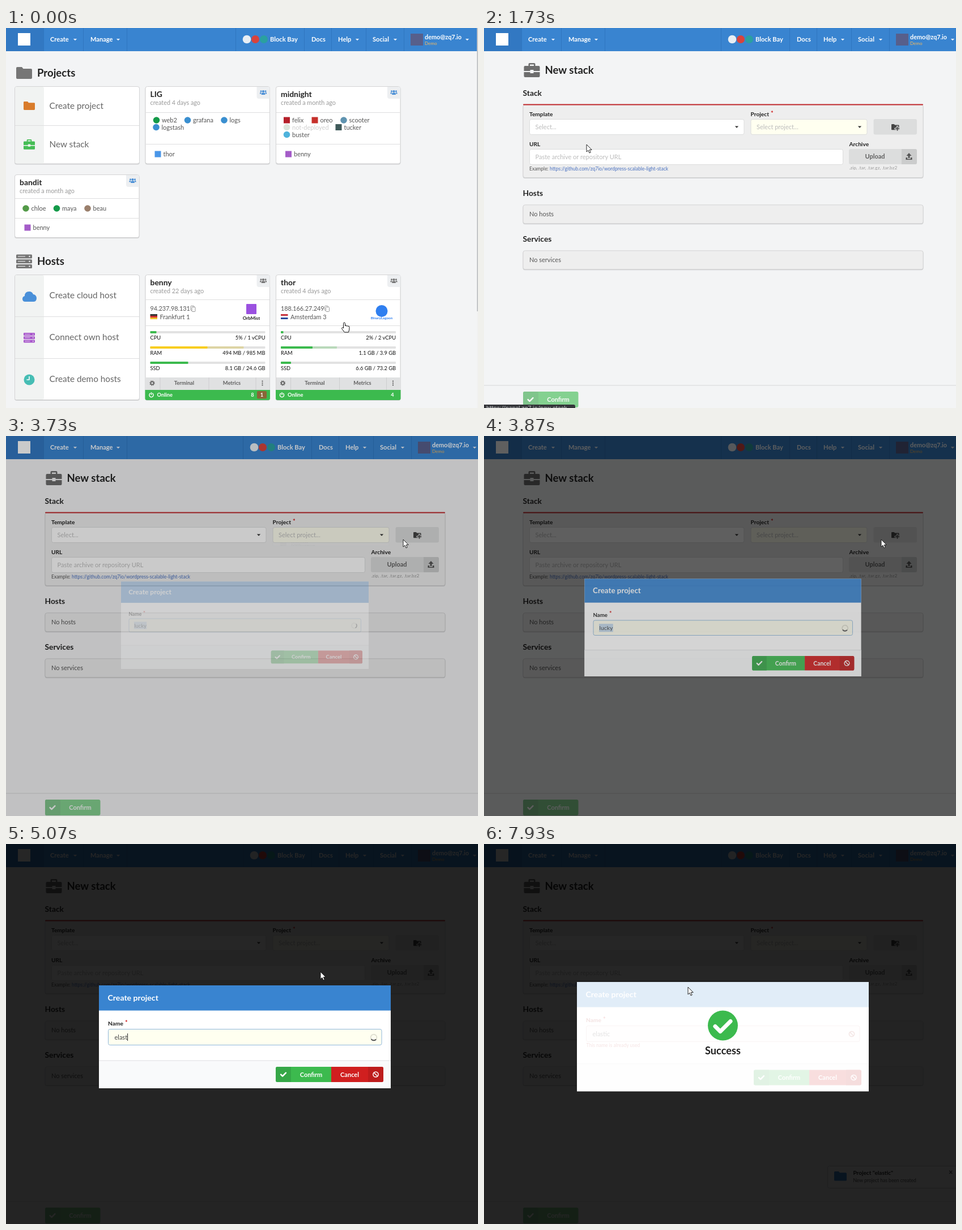
Animation of 833x672 px, one loop 8000 ms. Source, as an HTML page:

```html
<!DOCTYPE html>
<html lang="en">
<head>
<meta charset="utf-8">
<title>New stack</title>
<style>
html,body{margin:0;width:100%;height:100%;overflow:hidden;background:#f3f4f5}
svg{display:block;width:833px;height:672px}
text{font-family:Lato,sans-serif;white-space:pre}
</style>
</head>
<body>
<svg id="stage" viewBox="0 0 833 672" xmlns="http://www.w3.org/2000/svg"></svg>
<script>
const BLUE = '#3984d0', GREEN = '#3cba4e', RED = '#d01f1f', GREY = '#767676', INK = '#222';

// ---- drawing helpers, each returns SVG markup ----
const text = (x, y, s, size, fill = INK, bold = 0, anchor = 'start', more = '') =>
  `<text x="${x}" y="${y}" font-size="${size}" fill="${fill}" font-weight="${bold ? 700 : 400}" text-anchor="${anchor}" ${more}>${s}</text>`;
const rect = (x, y, w, h, fill, r = 0, more = '') =>
  `<rect x="${x}" y="${y}" width="${w}" height="${h}" rx="${r}" fill="${fill}" ${more}/>`;
const path = (d, fill, more = '') => `<path d="${d}" fill="${fill}" ${more}/>`;
const line = (d, color, w = 1) => path(d, 'none', `stroke="${color}" stroke-width="${w}" stroke-linecap="round" stroke-linejoin="round"`);
const dot = (x, y, r, fill) => `<circle cx="${x}" cy="${y}" r="${r}" fill="${fill}"/>`;
const group = (s, more = '') => `<g ${more}>${s}</g>`;
const at = (x, y, k, s) => group(s, `transform="translate(${x} ${y}) scale(${k})"`);
const rule = (x, y, w, c = '#dededf') => rect(x, y, w, 1, c);
const framed = (x, y, w, h, fill, stroke, r = 3) =>
  rect(x + .5, y + .5, w - 1, h - 1, fill, r, `stroke="${stroke}"`);
const panel = (x, y, w, h, fill = '#fff') =>
  rect(x, y + 1, w, h, '#cfd0d1', 4) + framed(x, y, w, h, fill, '#d4d4d5', 3.5);
const caret = (x, y, fill = '#333', k = 1) => at(x, y, k, path('M-3.2-1.6h6.4L0 1.8z', fill));

// ---- icons ----
const folder = (x, y, w, fill) => at(x, y, w / 28,
  path('M0 2Q0 0 2 0h8l2.5 3H26q2 0 2 2v14q0 2-2 2H2q-2 0-2-2z', fill));
const briefcase = (x, y, w, fill) => at(x, y, w / 28,
  path('M8 5V2q0-2 2-2h8q2 0 2 2v3h6q2 0 2 2v7H17v-2h-6v2H0V7q0-2 2-2zM10.5 5h7V2.5h-7z', fill, 'fill-rule="evenodd"') +
  path('M0 16h11v2h6v-2h11v7q0 2-2 2H2q-2 0-2-2z', fill));
const servers = (x, y, w, fill) => at(x, y, w / 28, [0, 8.7, 17.4].map(v =>
  rect(0, v, 28, 7, fill, 1.5) + rect(3, v + 3, 13, 1, '#f3f4f5') + dot(23.5, v + 3.5, 1.2, '#f3f4f5')).join(''));
const users = (x, y, fill) => at(x, y, 1,
  dot(0, -2, 2.1, fill) + dot(-4, -2.2, 1.5, fill) + dot(4, -2.2, 1.5, fill) +
  path('M-3.3 4V2.2Q-3.3.6-1.5.6h3q1.8 0 1.8 1.6V4z', fill) +
  path('M-6 2.4V1Q-6-.2-4.5-.2h1.4Q-4 1-4 2.4zM6 2.4V1Q6-.2 4.5-.2H3.1Q4 1 4 2.4z', fill));
const tick = (x, y, k, fill) => at(x, y, k, line('M-4.2.2L-1.4 3 4.2-2.8', fill, 2.4));
const ban = (x, y, fill) => at(x, y, 1, `<circle r="4.6" fill="none" stroke="${fill}" stroke-width="1.5"/>` + line('M-3-3L3 3', fill, 1.5));
const power = (x, y) => at(x, y, 1, line('M-2-2.8a3.6 3.6 0 1 0 4 0M0-4.2V-.5', '#fff', 1.4));
const gear = (x, y) => at(x, y, 1, `<circle r="2.6" fill="none" stroke="#666" stroke-width="1.9"/>` +
  `<circle r="4" fill="none" stroke="#666" stroke-width="1.3" stroke-dasharray="1.57 1.57"/>`);

// ---- navigation bar ----
function nav(dx, w) {
  const item = (x, s, c) => text(x, 24, s, 11.1, '#fff', 1) + (c ? caret(c, 20.5, '#e4eefa') : '');
  const sep = x => rect(x, 0, 1, 41, '#2f76c0');
  return rect(0, 0, w, 41, BLUE) + rect(0, 0, 66, 41, '#3278c2') + rect(21, 9, 22, 22, '#fff') +
    item(78, 'Create', 122) + item(149, 'Manage', 198) + [66, 136, 213].map(sep).join('') +
    group([405, 526, 574, 635, 702].map(sep).join('') +
      dot(425, 20, 7.3, '#e8eef4') + dot(440, 20, 7, '#d8433c') + dot(455, 20, 7, '#2aa0a0') +
      item(466, 'Block Bay') + item(539, 'Docs') + item(586, 'Help', 620) + item(647, 'Social', 687) +
      rect(714, 10, 22, 21, '#575f8c') + text(739, 20, 'demo@zq7.io', 10.8, '#fff', 1) +
      text(739, 30, 'Demo', 8.1, '#f5b95c') + caret(814, 20.5, '#e4eefa'), `transform="translate(${dx} 0)"`);
}

// ---- dashboard ----
function choices(y, h, rows) {
  const step = h / rows.length;
  return panel(15, y, 221, h) + rect(16, y + 1, 51, h - 2, '#f1f3f2', 3) +
    rows.map(([s, icon], i) => (i ? rule(16, Math.round(y + i * step), 219) : '') + icon +
      text(76.5, y + (i + .5) * step + 5.3, s, 15.3, '#666')).join('');
}
const head = (x, y, h, name, age, tint) => panel(x, y, 220.5, h) +
  path(`M${x + 197} ${y + 1}h20q3 0 3 3v18h-19q-4 0-4-4z`, '#edeff1') + users(x + 208.5, y + 11, tint) +
  text(x + 9, y + 19.3, name, 13.9, INK, 1) + text(x + 9, y + 33, 'created ' + age + ' ago', 10.8, '#999') ;
const tag = (x, y, s, c, round = 1, ink = '#555') =>
  (round ? dot(x - 16, y, 5.8, c) : rect(x - 21.5, y - 5.5, 11, 11, c)) + text(x - 6.5, y + 4, s, 11, ink);
function project(x, y, h, name, age, mid, low, tags) {
  return head(x, y, h, name, age, '#4a8fd6') + rule(x + 1, y + mid, 218.5) + rule(x + 1, y + low, 218.5) +
    tags.map(a => tag(...a)).join('');
}
const meter = (x, y, name, val, a, b, c, pale) => rect(x, y - 2, 203, 4, '#e2e2e2', 1) +
  (b ? rect(x, y - 2, b, 4, pale, 1) : '') + rect(x, y - 2, a, 4, c, 1) +
  text(x, y + 12.5, name, 9.3, '#111') + text(x + 203, y + 12.5, val, 9.3, '#111', 0, 'end');
function host(x, name, age, ip, place, flag, mark, meters, count) {
  const l = x + 9;
  const ipEnd = x + 84 + (ip.length > 13 ? 6 : 0);
  return head(x, 436, 222, name, age, GREY) + rule(x + 1, 480, 218.5) + rule(x + 1, 526, 218.5) +
    text(l, 500, ip, 10.8, '#555') + framed(ipEnd - 4, 491, 7, 9, '#fff', '#999', 1) + framed(ipEnd - 2, 493, 7, 9, '#fff', '#999', 1) +
    flag.map((c, i) => rect(l, 506 + i * 3, 12.5, 3, c)).join('') + text(x + 26, 514.5, place, 10.8, '#555') + mark +
    meters.map((m, i) => meter(l, 538 + i * 27, ...m)).join('') +
    rect(x + 1, 618, 218.5, 22, '#e0e1e2') + gear(x + 12.5, 628) +
    [26, 112, 195].map(d => rect(x + d, 618, 1, 22, '#cdcecf')).join('') +
    text(x + 69, 631.3, 'Terminal', 9.3, '#606060', 1, 'middle') + text(x + 153, 631.3, 'Metrics', 9.3, '#606060', 1, 'middle') +
    [-3.4, 0, 3.4].map(d => dot(x + 207, 628 + d, 1.1, '#555')).join('') +
    path(`M${x} 640h220.5v15q0 3-3 3h-214.500q-3 0-3-3z`, GREEN) + power(x + 11, 649) +
    text(x + 21, 652.3, 'Online', 9.3, '#fff', 1) + count;
}
const num = (x, s) => text(x, 652.3, s, 9.3, '#fff', 1, 'middle');

function dashboard() {
  const whale = '#3a8fd0', ngx = '#149a49', wave = '#a45cc8';
  return rect(0, 0, 833, 672, '#f3f4f5') + nav(0, 831) + rect(831, 0, 2, 672, '#f1f1f1') + rect(831, 0, 2, 501, '#c4c6c8') +
    folder(18, 69, 28, GREY) + text(55, 86, 'Projects', 18.57, INK, 1) +
    choices(103, 137.500, [['Create project', folder(31, 130, 20, '#d97c2b')], ['New stack', briefcase(31, 197, 20, '#45bd55')]]) +
    project(245.5, 103, 137.500, 'LIG', '4 days', 46, 102, [
      [281.5, 163, 'web2', ngx], [336.5, 163, 'grafana', whale], [401, 163, 'logs', whale],
      [281, 175.5, 'logstash', whale], [284, 223, 'thor', '#4a96e8', 0]]) +
    project(476, 103, 137.500, 'midnight', 'a month', 46, 102, [
      [511.5, 163, 'felix', '#b5202a', 0], [561, 163, 'oreo', '#c6302b', 0], [612, 163, 'scooter', '#5f93b0'],
      [511.5, 175.5, 'not-deployed', '#dde5dc', 1, '#cfcfcf'], [603, 175.5, 'tucker', '#3f5a5a', 0],
      [511.5, 188.5, 'buster', '#4fb3dc'], [514.5, 223, 'benny', wave, 0]]) +
    project(15, 259, 112, 'bandit', 'a month', 42, 77, [
      [51, 319, 'chloe', '#539a48'], [105.5, 319, 'maya', ngx], [160, 319, 'beau', '#9a7f6c'], [54, 353, 'benny', wave, 0]]) +
    servers(18, 400.5, 28, GREY) + text(55, 419, 'Hosts', 18.57, INK, 1) +
    choices(436, 222, [
      ['Create cloud host', path('M34 484q-5 0-5-5 0-4 4-5 0-8 8-8 5 0 7 5 5 0 6 6.500 0 6-5 6.500z', '#4a90d9')],
      ['Connect own host', servers(31, 539, 20, '#a959cc')],
      ['Create demo hosts', dot(41, 622, 9.5, '#46bdb4') + line('M41 616.5V622h-4', '#fff', 1.6)]]) +
    host(245.5, 'benny', '22 days', '94.237.98.131', 'Frankfurt 1', ['#333', '#d03030', '#f0c030'],
      rect(424, 488, 18, 18, '#9b51e0', 1) + text(433, 515.5, 'OrbMist', 8.2, INK, 1, 'middle'),
      [['CPU', '5% / 1 vCPU', 11, 0, GREEN], ['RAM', '494 MB / 985 MB', 101, 165, '#f8cd1c', '#ddd4a4'],
       ['SSD', '8.1 GB / 24.6 GB', 67, 0, GREEN]],
      num(435, '8') + rect(443, 642, 17, 13.500, '#8a6637', 2) + num(451.5, '1')) +
    host(476, 'thor', '4 days', '188.166.27.249', 'Amsterdam 3', ['#c8323c', '#fff', '#2c4c9c'],
      dot(663, 500.5, 10.5, '#2f7ff0') + text(663, 515, 'BinaryLagoon', 6.3, '#2f7ff0', 1, 'middle'),
      [['CPU', '2% / 2 vCPU', 4.5, 0, GREEN], ['RAM', '1.1 GB / 3.9 GB', 56, 99, GREEN, '#b9d9ba'],
       ['SSD', '6.6 GB / 73.2 GB', 18, 0, GREEN]], num(682, '4'));
}

// ---- form page ----
function formPage() {
  const label = (x, y, s) => text(x, y, s, 10.2, INK, 1);
  const field = (x, y, w, s, fill = '#fff') => framed(x, y, w, 28, fill, '#dcdddd') + text(x + 10.5, y + 18, s, 11, '#bcbcbc');
  const row = (y, title, s) => text(68.5, y, title, 13.8, INK, 1) + panel(68.5, y + 15, 707, 34, '#eee') + text(80, y + 35.8, s, 11, '#555');
  return rect(0, 0, 833, 672, '#f3f4f5') + nav(13, 833) +
    briefcase(70.5, 62, 28, '#6d6d6d') + text(107.5, 81, 'New stack', 18.57, INK, 1) +
    text(68.5, 120.3, 'Stack', 13.8, INK, 1) + panel(68.5, 135, 707, 130, '#eee') + rect(69, 134.5, 706, 2, '#c0292c', 1) +
    label(80, 156.3, 'Template') + field(80, 161, 379.5, 'Select...') + caret(446, 175) +
    label(470.5, 156.3, 'Project') + text(506, 155, '*', 11, RED, 1) + field(470.5, 161, 206, 'Select project...', '#fffff0') + caret(663, 175) +
    rect(687.5, 161, 76.5, 27.5, '#dcdddd', 3) + folder(719, 170, 13.5, '#444') +
    line('M729.5 174.5v7M726 178h7', '#dcdddd', 3.6) + line('M729.5 175v6M726.5 178h6', '#444', 1.7) +
    label(80, 209.3, 'URL') + field(80, 214, 554, 'Paste archive or repository URL') +
    text(80, 251.500, 'Example:', 8.5, '#555') +
    text(116, 251.500, 'https://github.com/zq7io/wordpress-scalable-light-stack', 8.5, '#4870c0') +
    label(644.5, 209.3, 'Archive') + rect(644, 214, 120, 27, '#dcdddd', 3) + path('M737 214h24q3 0 3 3v21q0 3-3 3h-24z', '#cbcccc') +
    text(690, 231.3, 'Upload', 11, '#606060', 1, 'middle') +
    path('M750 221l4.500 5h-3v4h-3v-4h-3zM744.500 229h2.500v2.500h6V229h2.500v4h-11z', '#555') +
    text(644.5, 250, '.zip, .tar, .tar.gz, .tar.bz2', 8.3, '#9a9a9a') +
    row(297.300, 'Hosts', 'No hosts') + row(378.300, 'Services', 'No services') +
    rule(0, 631.5, 833, '#d6d7d8') +
    group(rect(69, 643, 97.5, 28, GREEN, 3) + rect(69, 643, 27, 28, '#35a747', 3) + tick(82, 657, 1.05, '#fff') +
      text(131, 661, 'Confirm', 11, '#fff', 1, 'middle'), 'opacity=".6"');
}
const menu = () => framed(470.5, 188, 206, 86, '#fff', '#96c8da') + rect(471.5, 189, 204, 28, '#f2f2f2', 0, 'id="hover"') +
  ['bandit', 'LIG', 'midnight'].map((s, i) => folder(484, 199 + i * 28, 11, '#555') + text(503, 207 + i * 28, s, 11)).join('');
const toast = () => framed(606, 569, 240, 40, '#f7f8f9', '#c9cacb') + folder(618, 579, 22, BLUE) +
  text(651.5, 584.800, 'Project "elastic"', 10, INK, 1) + text(651.5, 598.300, 'New project has been created', 8.5, '#555') +
  line('M821.500 578l4.500 4.500M826 578l-4.500 4.500', '#555', 1.3);

// ---- modal ----
function modal() {
  return rect(164, 250, 515, 182, '#fff', 0, 'id="sheet"') +
    group(rect(164, 250, 515, 44.5, BLUE) + text(179.5, 276.800, 'Create project', 14.1, '#fff', 1) +
      text(180, 321.300, 'Name', 10.2, INK, 1, 'start', 'id="label"') + text(210, 319.500, '*', 11, RED, 1) +
      rect(180.5, 327.5, 482.5, 28, '#fffff0', 3, 'id="input" stroke="#8fb8dc"') +
      rect(191, 334, 10, 15, '#c3d9ec', 0, 'id="mark"') + text(191.5, 345.800, '', 11, '#444', 0, 'start', 'id="value"') +
      rect(191, 335, 1, 13, '#222', 0, 'id="beam"') +
      group(tick(649, 342, 1.05, GREEN), 'id="okIcon"') + group(ban(649, 342, '#b0504c'), 'id="badIcon"') +
      group('<circle r="5.300" fill="none" stroke="#000" stroke-opacity=".12" stroke-width="1.900"/>' +
        line('M-3.750-3.750A5.300 5.300 0 0 1 3.750-3.750', '#555', 1.9), 'id="spin"') +
      text(180.5, 365.300, 'This name is already used', 8.5, '#c04a46', 0, 'start', 'id="error"'), 'id="upper"') +
    group(rect(164, 383, 515, 49, '#f9fafb') + rule(164, 382.500, 515, '#dfe0e1') +
      path('M479 394h95v27h-95q-3 0-3-3v-21q0-3 3-3z', GREEN) + path('M479 394h24v27h-24q-3 0-3-3v-21q0-3 3-3z', '#35a747') +
      path('M574 394h89q3 0 3 3v21q0 3-3 3h-89z', RED) + path('M639 394h24q3 0 3 3v21q0 3-3 3h-24z', '#bd1c1c') +
      tick(489.500, 407.500, 1.05, '#fff') + text(538.5, 411.500, 'Confirm', 11, '#fff', 1, 'middle') +
      text(606.5, 411.500, 'Cancel', 11, '#fff', 1, 'middle') + ban(652.5, 407.500, '#fff'), 'id="lower"') +
    rect(164, 244, 515, 193, '#fff', 0, 'id="veil"') +
    group(dot(421.5, 321, 26.5, GREEN) + line('M408 322.500l9 9 18-18', '#fff', 7) +
      text(421.5, 371.800, 'Success', 18.2, INK, 1, 'middle'), 'id="done"');
}

const stage = document.getElementById('stage');
stage.innerHTML = group(dashboard(), 'id="home"') +
  group(formPage() + group(menu(), 'id="menu"') + group(toast(), 'id="toast"'), 'id="form"') +
  group(rect(-3, 666, 164, 9, '#35363a', 3) +
    text(4, 675.500, 'https://panel.zq7.io/new-stack', 10.5, '#c4c6c9', 0, 'start', 'style="font-family:Roboto,sans-serif"'), 'id="status"') +
  rect(0, 0, 833, 672, '#000', 0, 'id="dim"') + group(modal(), 'id="modal"') +
  group(group(path('M0 0V13L3 10.300 5 15 7.200 14 5.200 9.400H9.200z', '#fff', 'stroke="#111" stroke-width=".9"'), 'id="arrow"') +
    group(path('M-1.500 1.500a1.500 1.500 0 0 1 3 0V6a1.300 1.300 0 0 1 2.600.4 1.300 1.300 0 0 1 2.500.5 1.200 1.200 0 0 1 2.300.6V12L7.500 17H.3L-4.500 10.500a1.400 1.400 0 0 1 2-1.600L-1.500 10z',
      '#fff', 'stroke="#111" stroke-width="1"'), 'id="hand"'), 'id="cursor"');

const el = {};
stage.querySelectorAll('[id]').forEach(n => el[n.id] = n);
const set = (id, a) => { for (const k in a) el[id].setAttribute(k, a[k]); };
const show = (id, on) => set(id, { opacity: +on });

// ---- motion ----
const clamp = v => Math.max(0, Math.min(1, v));
function ease(x) {
  let lo = 0, hi = 1;
  for (let i = 0; i < 24; i++) {
    const u = (lo + hi) / 2;
    const bx = .75 * u * (1 - u) ** 2 + .75 * u * u * (1 - u) + u ** 3;
    if (bx < x) lo = u; else hi = u;
  }
  const u = (lo + hi) / 2;
  return .3 * u * (1 - u) ** 2 + 3 * u * u * (1 - u) + u ** 3;
}
const ramp = (t, start, len) => ease(clamp((t - start) / len));

// cursor stops: time, x, y
const stops = [
  [0, 597, 521], [67, 490, 455], [133, 340, 358], [200, 270, 317], [400, 270, 317], [600, 226, 270], [800, 188, 215],
  [1000, 181, 206], [1940, 181, 206], [2070, 330, 206], [2200, 535, 201], [2267, 562, 199], [2400, 562, 199],
  [2530, 565, 178], [2730, 567, 180], [2930, 590, 214], [3200, 678, 196], [3270, 678, 196], [3470, 701, 183],
  [3867, 701, 183], [3933, 694, 184], [4000, 673, 187], [4067, 618, 206], [4133, 570, 222], [4200, 555, 226],
  [6467, 555, 226], [6600, 530, 222], [6870, 410, 240], [7130, 360, 253], [8000, 360, 253]];
function cursorAt(t) {
  let i = 1;
  while (i < stops.length - 1 && stops[i][0] < t) i++;
  const [a, x, y] = stops[i - 1], [b, p, q] = stops[i];
  const k = clamp((t - a) / (b - a));
  return [x + (p - x) * k, y + (q - y) * k];
}

function render(ms) {
  const t = Math.floor((ms + 3.5) / 66.6667) * 66.6667;
  const home = t < 1660;
  el.home.style.display = home ? '' : 'none';
  el.form.style.display = home ? 'none' : '';
  show('status', t > 725 && t < 2060);

  const [x, y] = cursorAt(t);
  const hand = home ? t < 60 || x < 237 : t > 2520 && t < 3640;
  set('cursor', { transform: `translate(${x} ${y})` });
  show('hand', hand);
  show('arrow', !hand);

  const open = ramp(t, 2590, 200) * (1 - ramp(t, 3600, 200));
  set('menu', { opacity: open, transform: `translate(0 ${188 * (1 - open)}) scale(1 ${open})` });
  show('hover', y > 189 && x < 676);

  const p = ramp(t, 3645, 500), s = .8 + .2 * p;
  show('dim', 0);
  set('dim', { opacity: .85 * p });
  set('modal', { opacity: p, transform: `translate(421.5 298) scale(${s}) translate(-421.5 -298)` });

  // name field
  const typing = t >= 4660;
  const chars = Math.min(7, 1 + Math.floor((t - 4660) / 100));
  el.value.textContent = typing ? 'elastic'.slice(0, chars) : 'lucky';
  const w = el.value.getComputedTextLength();
  const failed = t > 7120;
  const busy = t < 4190 || typing && t < 6060;
  set('mark', { width: w + 1, opacity: +(!typing || t > 6060 && !failed) });
  set('beam', { x: 191.5 + w, opacity: +(typing && t < 6060) });
  show('spin', busy);
  set('spin', { transform: `translate(649 342) rotate(${185 + (t - 3870) * .6})` });
  show('okIcon', !busy && !failed);
  show('badIcon', failed);
  show('error', failed);
  set('label', { fill: failed ? '#b0403c' : INK });
  set('input', { fill: failed ? '#fff6f6' : '#fffff0', stroke: failed ? '#e0b4b4' : '#8fb8dc' });

  const grow = failed ? 1 : 0;
  set('sheet', { y: 250 - 6 * grow, height: 182 + 11 * grow });
  set('upper', { transform: `translate(0 ${-6 * grow})` });
  set('lower', { transform: `translate(0 ${5.5 * grow})` });
  set('veil', { y: 250 - 6 * grow, height: 182 + 11 * grow, opacity: .85 * ramp(t, 6730, 300) });
  show('done', ramp(t, 7260, 250));

  const slide = ramp(t, 7330, 400);
  set('toast', { opacity: slide, transform: `translate(${230 * (1 - slide)} 0)` });
}

const begin = performance.now();
function tickFrame() {
  render((performance.now() - begin) % 8000);
  requestAnimationFrame(tickFrame);
}
render(0);
requestAnimationFrame(tickFrame);
</script>
</body>
</html>
```
